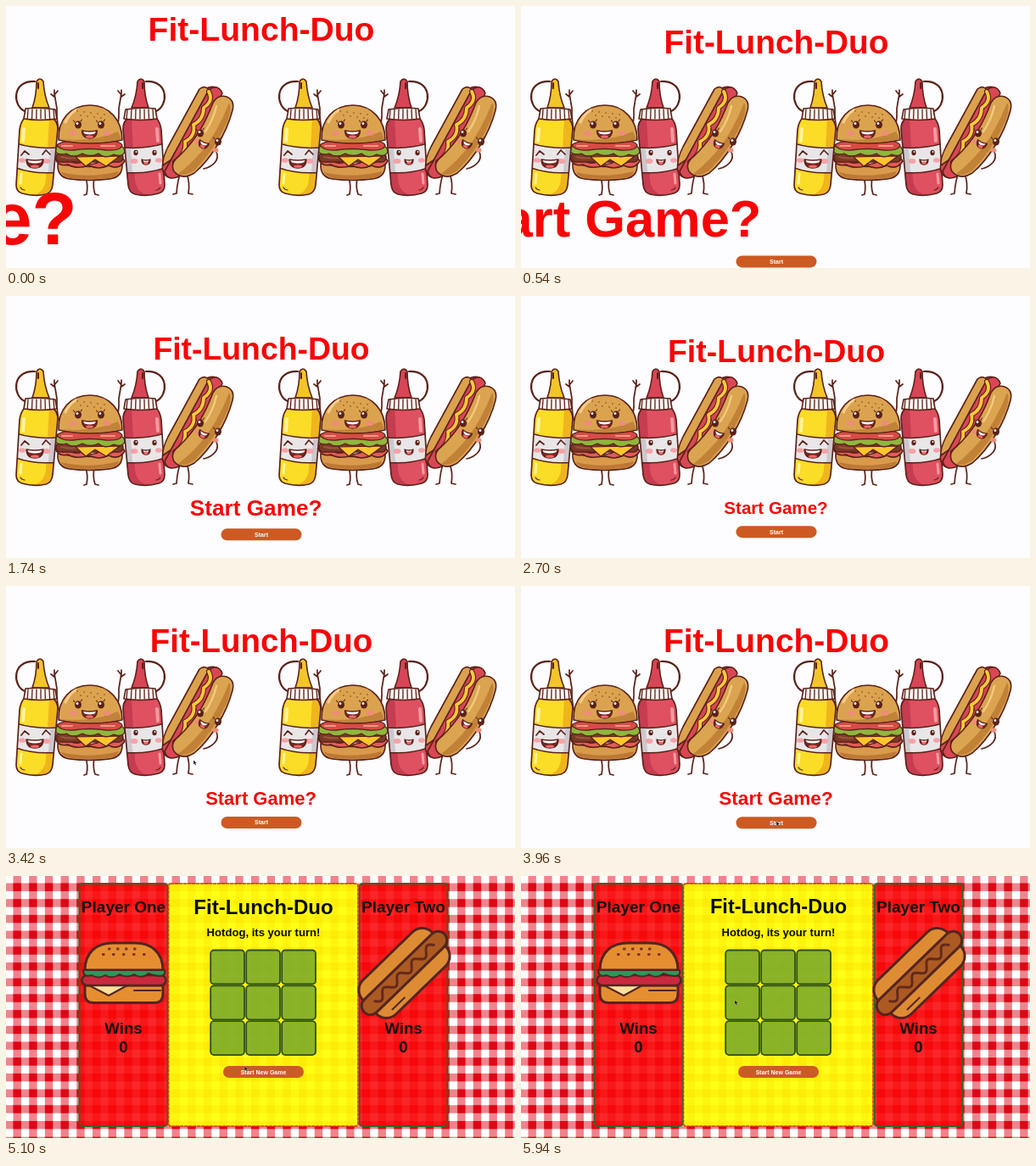
Write an HTML page with a canvas that moves like this. It is 600 by 309 pixels and loops after 6 s.

```html
<!DOCTYPE html>
<html lang="en">
<head>
<meta charset="utf-8">
<title>Fit-Lunch-Duo</title>
<style>
html, body { margin: 0; width: 100%; height: 100%; overflow: hidden; background: #fdfcfe; }
canvas { display: block; width: 600px; height: 309px; }
</style>
</head>
<body>
<canvas id="stage" width="600" height="309"></canvas>
<script>
const ctx = document.getElementById('stage').getContext('2d');
const LOOP = 6000, SWITCH = 4140;
const NAME = 'Fit-Lunch-Duo';
const INK = '#5b2118', CRUST = '#54251f';

function paint(path, fill, stroke, width = 1.6) {
  const p = typeof path === 'string' ? new Path2D(path) : path;
  if (fill) { ctx.fillStyle = fill; ctx.fill(p); }
  if (stroke) { ctx.strokeStyle = stroke; ctx.lineWidth = width; ctx.stroke(p); }
}

function line(d, color = INK, width = 1.7) { paint(d, null, color, width); }

function oval(x, y, rx, ry, fill, stroke, tilt = 0) {
  const p = new Path2D();
  p.ellipse(x, y, rx, ry, tilt, 0, 7);
  paint(p, fill, stroke);
}

function box(x, y, w, h, r, fill, stroke, width) {
  const p = new Path2D();
  p.roundRect(x, y, w, h, r);
  paint(p, fill, stroke, width);
}

function label(text, x, baseline, size, color) {
  ctx.font = `bold ${size}px "Liberation Sans", Arial, sans-serif`;
  ctx.textAlign = 'center';
  ctx.fillStyle = color;
  ctx.fillText(text, x, baseline);
}

function button(text, x, y) {
  box(x - 47.5, y - 7, 95, 14, 7, '#cd5a22');
  label(text, x, y + 2.5, 7, '#fff');
}

function mirrored(axis, draw) {
  ctx.save();
  ctx.translate(axis * 2, 0);
  ctx.scale(-1, 1);
  draw();
  ctx.restore();
}

function eye(x, y) {
  oval(x, y, 4, 4.5, INK);
  oval(x - 1, y - 1.6, 1.4, 1.5, '#fff');
  line(`M${x - 4} ${y - 3}l-1.5 -2M${x + 3} ${y - 4}l1.5 -2`, INK, 1.1);
}

function mouth(x, y, w, h) {
  paint(`M${x - w} ${y}Q${x} ${y + 2} ${x + w} ${y}Q${x + w} ${y + h} ${x} ${y + h}Q${x - w} ${y + h} ${x - w} ${y}Z`, '#7c2420', INK, 1.3);
  paint(`M${x - w + 1.5} ${y + 1}Q${x} ${y + 2.5} ${x + w - 1.5} ${y + 1}l-1.5 2.6Q${x} ${y + 5.5} ${x - w + 3} ${y + 3.6}Z`, '#fff');
  oval(x, y + h - 1.8, w * 0.5, 1.6, '#f2696b');
}

function bottle(body, shade, shine, nozzle, happy) {
  line('M22 124C8 118 6 88 34 89', INK, 2.2);
  paint('M31 120Q36 106 36 89Q40 83 44 89Q45 106 51 120Z', nozzle, INK);
  line('M38 91v6', INK, 2);
  const shell = 'M21 133Q17 138 16 146L12 211Q12 219 19 221Q34 225 47 222Q54 220 55 211L61 145Q61 137 56 133Z';
  paint(shell, body);
  ctx.save();
  ctx.clip(new Path2D(shell));
  paint('M51 132L62 132V224H30Q46 220 47 204Z', shade);
  paint('M12 162Q34 169 62 167V196Q34 199 12 191Z', '#e9e6e8', INK);
  paint('M52 168H62V196H50Z', '#cbc8ce');
  line('M21 145l-1 14', shine, 4);
  line('M18 198l-1 11', shine, 3);
  ctx.restore();
  line(shell);
  paint('M23 121Q40 119 58 122L60 133Q40 136 21 133Z', '#faf5f2', INK);
  for (let x = 26; x < 57; x += 5) line(`M${x} 122l${(x - 40) / 18} 11`, INK, 1.3);
  oval(19, 182, 4, 2.7, '#f4a2a8');
  oval(48, 183, 4.5, 2.9, '#f4a2a8');
  if (happy) line('M18 176l4 -5l5 4M43 175l4 -5l5 5');
  else [24, 46].forEach(x => { oval(x, 173, 2.6, 3.3, INK); oval(x - .5, 172, .9, 1, '#fff'); });
  mouth(34, 181, happy ? 10 : 5, happy ? 10 : 6);
  line('M17 214q2 3 5 3', INK, 1.2);
}

function cuteBurger() {
  const arm = () => line('M66 158Q59 140 60 121L57 103M57 107l-4 -3M57 105l4 -5M57 103l0 -4');
  arm();
  mirrored(96.5, arm);
  line('M94 203q3 8 1 19l-3 1M104 203q-2 10 1 19l4 1');
  paint('M61 186Q98 193 137 186Q138 202 122 204Q98 207 75 204Q60 202 61 186Z', '#d99b4b', INK);
  paint('M65 196Q98 204 133 195Q132 202 120 203Q98 205 76 203Q67 201 65 196Z', '#bd7835');
  paint('M58 180Q65 174 73 181Q82 188 91 183Q101 190 111 183Q121 189 129 182Q137 176 140 183Q133 194 121 188Q109 194 98 188Q83 193 73 187Q62 190 58 180Z', '#e45c57', INK);
  box(59, 173, 79, 11, 5, '#793b28', INK);
  line('M65 178q12 3 23 0m8 2q9 2 18 -1', '#9d5539', 2);
  paint('M82 178L134 177L118 189L105 181L94 189Z', '#ffc52f', INK, 1.2);
  paint('M57 170Q61 161 70 167Q81 162 88 168Q99 164 108 169Q121 162 128 166Q139 162 140 172Q137 179 127 175Q117 181 109 174Q99 179 90 174Q79 180 71 174Q61 177 57 170Z', '#8fb63d', INK, 1.3);
  paint('M60 164Q67 157 99 159Q132 156 137 164Q136 171 118 170Q99 167 79 170Q64 171 60 164Z', '#d94b46', INK, 1.3);
  line('M66 165h12M112 165h16', '#f69b83', 2);
  paint('M62 158C61 134 76 117 99 117C122 117 137 135 137 158Q99 166 62 158Z', '#dba34f', INK);
  paint('M66 157Q102 161 132 148L136 157Q99 165 66 157Z', '#c18239');
  line('M70 137Q75 127 82 123', '#f5ce8b', 3);
  for (let i = 0; i < 9; i++) oval(84 + i * 4, 124 + (i * 5) % 9, 1, .7, '#8e5126');
  oval(79, 150, 5, 3, '#ee8d78');
  oval(119, 150, 5, 3, '#ee8d78');
  eye(85, 140); eye(112, 140);
  mouth(98.5, 147, 9, 9);
}

function cuteHotdog() {
  line('M206 196q-4 10 -5 25l-4 1M213 198q4 10 2 23l5 1M196 176q-8 8 -1 17l7 2');
  paint('M233 99Q245 91 254 101L203 197Q192 207 186 197Q181 188 190 177Z', '#d94b51', INK);
  paint('M228 98Q235 92 241 101L195 181L185 188Q184 180 191 166Z', '#dba24e', INK);
  paint('M239 99Q250 91 255 103L204 201Q190 207 187 195Z', '#d94754', INK);
  const mustard = 'M239 101Q245 112 233 120Q233 134 221 140Q224 153 211 160Q213 174 199 184';
  line(mustard, INK, 6);
  line(mustard, '#ffc83a', 3.8);
  paint('M244 114Q250 104 260 107Q270 111 267 123C260 150 242 180 222 197Q207 206 198 195Q193 185 204 177C224 158 235 138 244 114Z', '#dba451', INK);
  paint('M263 114Q267 120 261 136Q246 170 222 194Q210 202 203 198Q232 175 248 146Q257 130 263 114Z', '#c18237');
  line('M248 118Q244 135 235 148', '#f3c981', 2.4);
  line('M248 172C252 181 245 189 233 192');
  oval(225, 160, 3.5, 2.7, '#ee8d78');
  oval(247, 170, 3.5, 2.7, '#ee8d78');
  eye(229, 150); eye(250, 160);
  ctx.save();
  ctx.translate(234, 160); ctx.rotate(.4);
  mouth(0, 0, 6, 8);
  ctx.restore();
}

function snackGroup() {
  cuteBurger();
  bottle('#fbdc26', '#efb51d', '#fff3a0', '#f2c628', true);
  mirrored(99.5, () => bottle('#df5061', '#c63c50', '#f59aa0', '#d84557', false));
  cuteHotdog();
}

function arrow(x, y) {
  paint(`M${x - 1} ${y - 2.5}v5l1.2 -1l1 2l1 -.5l-1 -2h1.7Z`, '#151515', 'rgba(255,255,255,.6)', .4);
}

function cursor(t) {
  if (t < 3360) return;
  const ease = (a, b) => {
    const p = Math.min(1, Math.max(0, (t - a) / (b - a)));
    return p * p * (3 - 2 * p);
  };
  const a = ease(3420, 3960), b = ease(4500, 5880);
  arrow(222 + 80 * a - 49 * b, 208 + 72 * a - 131 * b);
}

// Slow breathing shared by both headings
const breathe = t => Math.cos(t / 4300 * Math.PI * 2);

function welcome(t) {
  ctx.fillStyle = '#fdfcfe';
  ctx.fillRect(0, 0, 600, 309);
  for (const x of [0, 310]) {
    ctx.save();
    ctx.translate(x, 0);
    snackGroup();
    ctx.restore();
  }
  const left = Math.max(0, 1 - t / 2400);
  const swell = t > 2500 ? 1.07 * (1 - Math.cos((t - 2500) / 2920 * Math.PI * 2)) : 0;
  const size = 20.5 + 66.5 * left ** 1.9 + swell;
  const titleY = 76.6 - .57 * size;
  const titleSize = 38.15 + .95 * breathe(t);
  label(NAME, 301, titleY + .36 * titleSize, titleSize, '#f60606');
  label('Start Game?', 300.5 - 476 * left ** 3.4, 250 + .36 * size, size, '#f60606');
  button('Start', 301, 343 - titleY);
}

function gingham() {
  const step = 18.7, check = step / 2, start = 8.5;
  ctx.fillStyle = '#fff';
  ctx.fillRect(0, 0, 600, 309);
  ctx.fillStyle = 'rgba(225,8,28,.5)';
  for (let p = start - step; p < 600; p += step) {
    ctx.fillRect(p, 0, check, 309);
    ctx.fillRect(0, p, 600, check);
  }
  ctx.fillStyle = '#dc0816';
  for (let x = start - step; x < 600; x += step) {
    for (let y = start - step; y < 309; y += step) ctx.fillRect(x, y, check, check);
  }
}

function flatBurger() {
  paint('M93 111C93 89 108 79 126 79H152C170 79 185 89 185 111Z', '#e58e31', CRUST, 3);
  for (let i = 0; i < 9; i++) {
    const upper = i < 4;
    box(upper ? 120 + i * 10 : 113 + (i - 4) * 12, upper ? 84.5 : 91, 3.5, 3, 1, '#81331f');
  }
  paint('M93 129H185V139Q185 149.5 175 149.5H103Q93 149.5 93 139Z', '#e58e31', CRUST, 3);
  line('M151 135H182', CRUST, 2);
  paint('M98 129H143L121 141Z', '#ffdf9c', CRUST, 2);
  box(89.5, 117, 99, 12, 6, '#c9283e', CRUST, 2.5);
  paint('M91 111H187Q189 118 181 118Q174 118 168 115Q160 122 151 116Q143 121 134 116Q125 122 117 117Q109 122 101 117Q91 120 91 111Z', '#2b985b', CRUST, 2);
}

function capsule(half, r, y, fill) {
  box(-half, y - r, half * 2, r * 2, r, fill, CRUST, 3);
}

function flatHotdog() {
  ctx.save();
  ctx.translate(469.5, 114.5);
  ctx.rotate(-.77);
  capsule(57, 16.5, -11.5, '#de8c34');
  capsule(57, 16.5, 11.5, '#de8c34');
  capsule(66, 10.5, 0, '#ac5a22');
  const wave = new Path2D();
  for (let x = -48; x <= 48; x++) wave.lineTo(x, 4.5 * Math.sin(x / 3.8));
  paint(wave, null, '#64291a', 3);
  line('M-40 21H-20', CRUST, 2);
  ctx.restore();
}

function player(title, x) {
  box(x, 9, 104, 286, 4, 'rgba(250,8,10,.88)', '#27682a', 1.8);
  const mid = x + 52;
  label(title, mid, 42.5, 19, '#161010');
  label('Wins', mid, 186, 18.7, '#161010');
  label('0', mid, 208, 18.7, '#161010');
}

function game(t) {
  gingham();
  player('Player One', 86.5);
  player('Player Two', 416.5);
  ctx.fillStyle = 'rgba(255,255,5,.92)';
  ctx.fillRect(191, 9, 224, 286);
  ctx.setLineDash([3, 2]);
  box(191.5, 9, 223.5, 286, 3, null, '#db3a12', 1.7);
  ctx.setLineDash([]);
  flatBurger();
  flatHotdog();
  const size = 23.9 + .4 * breathe(t);
  label(NAME, 303.5, 36 + .36 * size, size, '#0c0c06');
  label('Hotdog, its your turn!', 303.5, 70.5, 13.1, '#0c0c06');
  for (let i = 0; i < 9; i++) {
    box(241.2 + i % 3 * 42, 87.5 + Math.floor(i / 3) * 41.8, 39.8, 40, 4, 'rgba(124,170,43,.88)', '#2c5018', 1.8);
  }
  button('Start New Game', 303.5, 231);
}

function frame(now) {
  const t = now % LOOP;
  ctx.lineCap = ctx.lineJoin = 'round';
  (t < SWITCH ? welcome : game)(t);
  cursor(t);
  requestAnimationFrame(frame);
}
requestAnimationFrame(frame);
</script>
</body>
</html>
```
